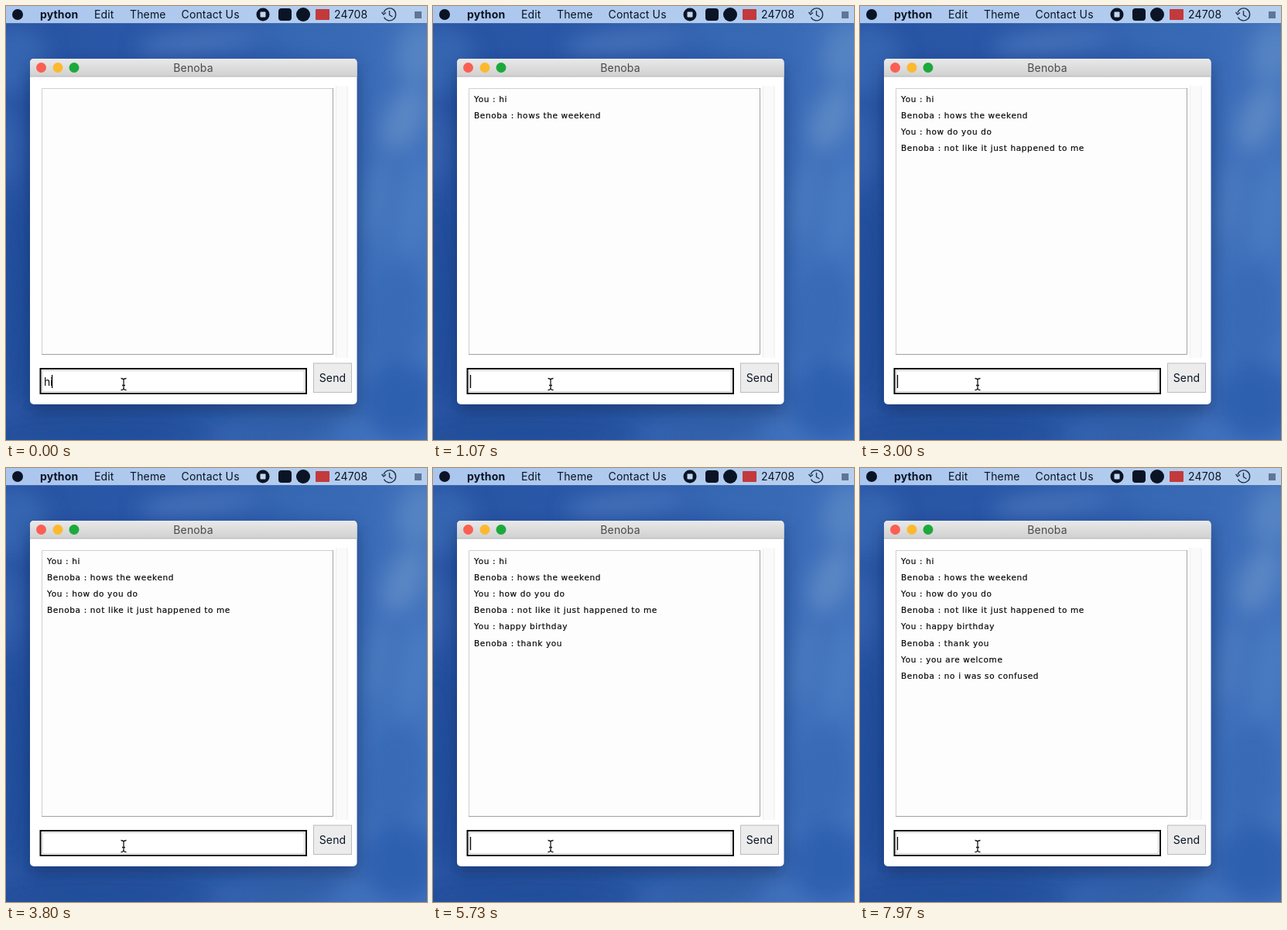
An HTML page that plays this animation: 544 by 560 pixels, repeating every 8000 ms.

```html
<!DOCTYPE html>
<html lang="en">
<head>
<meta charset="utf-8">
<title>Chat window</title>
<style>
html, body { margin: 0; width: 100%; height: 100%; overflow: hidden; background: #2a58a6; }
svg { display: block; width: 544px; height: 560px; }
text { white-space: pre; }
.ui { font: 14px Inter, "Open Sans", sans-serif; letter-spacing: .15px; fill: #0a1424; }
.entry { font: 14px Inter, "Open Sans", sans-serif; letter-spacing: -.3px; fill: #0a0a0a; }
.log { font: 10.5px "DejaVu Sans", sans-serif; letter-spacing: .64px; fill: #0a0a0a; stroke: #0a0a0a; stroke-width: .2px; }
</style>
</head>
<body>
<svg viewBox="0 0 544 560">
  <defs>
    <linearGradient id="sky" x2="1" y2=".15">
      <stop offset="0" stop-color="#2853a2"/>
      <stop offset=".5" stop-color="#2b5aaa"/>
      <stop offset="1" stop-color="#4273bd"/>
    </linearGradient>
    <linearGradient id="menu">
      <stop offset="0" stop-color="#abc6ee"/>
      <stop offset="1" stop-color="#b6cfee"/>
    </linearGradient>
    <linearGradient id="bar" x2="0" y2="1">
      <stop offset="0" stop-color="#e9e9e9"/>
      <stop offset="1" stop-color="#d0d0d0"/>
    </linearGradient>
    <filter id="soft" x="-60%" y="-60%" width="220%" height="220%"><feGaussianBlur stdDeviation="13"/></filter>
    <filter id="shade" x="-20%" y="-20%" width="140%" height="140%"><feGaussianBlur stdDeviation="11"/></filter>
  </defs>

  <rect width="544" height="560" fill="url(#sky)"/>
  <g id="clouds" filter="url(#soft)"></g>
  <rect x="30" y="78" width="424" height="446" rx="6" fill="#0c2452" opacity=".5" filter="url(#shade)"/>

  <rect width="544" height="22" fill="url(#menu)"/>
  <path d="M0 22.5H544" stroke="#4a70ac" opacity=".6"/>
  <circle cx="15" cy="11" r="7" fill="#0a1424"/>
  <g class="ui">
    <text x="44" y="16" font-weight="700">python</text>
    <text x="114" y="16">Edit</text>
    <text x="160" y="16">Theme</text>
    <text x="226.5" y="16">Contact Us</text>
    <text x="424" y="16">24708</text>
  </g>
  <circle cx="332" cy="11" r="8.5" fill="#0a1424"/>
  <rect x="328.5" y="7.5" width="7" height="7" rx="1" fill="#c2d6f0"/>
  <rect x="352" y="3" width="17" height="16" rx="4" fill="#0a1424"/>
  <circle cx="384" cy="11" r="9" fill="#0a1424"/>
  <rect x="400" y="4" width="18" height="14" rx="1" fill="#c23a3c"/>
  <g fill="none" stroke="#22344e" stroke-width="1.4">
    <path d="M488.5 14.5A8 8 0 1 0 488 8.5M485.5 8l2.4 3 3-2.5"/>
    <path d="M495.5 6v5.5l4 2.5"/>
  </g>
  <rect x="528" y="7" width="9" height="9" fill="#5f7698"/>

  <rect x="31" y="68" width="422.5" height="446" rx="5" fill="#fff"/>
  <path d="M31 91V73q0-5 5-5H448.5q5 0 5 5V91z" fill="url(#bar)"/>
  <path d="M31 91H453.5" stroke="#b4b4b4"/>
  <circle cx="45.5" cy="79.5" r="6.5" fill="#fa5f52"/>
  <circle cx="67" cy="79.5" r="6.5" fill="#fcb92e"/>
  <circle cx="88" cy="79.5" r="6.5" fill="#1ca93c"/>
  <text class="ui" x="242" y="85" text-anchor="middle" style="fill:#4a4a4a">Benoba</text>

  <rect x="46" y="106" width="376.5" height="344" fill="#fdfdfd"/>
  <path d="M46.5 450V106.5H422" fill="none" stroke="#cfcfcf"/>
  <path d="M46 449.5H422.5V106" fill="none" stroke="#a2a2a2"/>
  <rect x="426" y="103" width="15.5" height="351" fill="#fafafa"/>
  <path d="M426.5 103V454M441 103V454" stroke="#eee"/>
  <g id="log" class="log"></g>

  <rect x="44.5" y="468" width="343.5" height="32" fill="#fff" stroke="#080808" stroke-width="2"/>
  <rect x="47" y="470.5" width="338.5" height="27" fill="none" stroke="#cdcdcd"/>
  <text id="entry" class="entry" x="49" y="489.5"></text>
  <path id="caret" d="M0 476V493" stroke="#080808" stroke-width="1.3"/>
  <rect x="397.5" y="461" width="49" height="37.5" fill="#ececec" stroke="#bcbcbc"/>
  <text class="ui" x="422" y="484.5" text-anchor="middle">Send</text>

  <path d="M148.5 480.5q3.500 0 3.500 2.500v10q0 2.500-3.500 2.500M155.500 480.500q-3.500 0-3.500 2.500v10q0 2.500 3.500 2.500M150 489.500h4" fill="none" stroke="#1a1a1a" stroke-width="1.3"/>
</svg>
<script>
const LOOP = 8000, BOT = "Benoba";
// start and end of typing, and the moment of sending, in ms
const turns = [
  { say: "hi", from: -300, to: 0, sent: 600, reply: "hows the weekend" },
  { say: "how do you do", from: 1250, to: 2150, sent: 2950, reply: "not like it just happened to me" },
  { say: "happy birthday", from: 3980, to: 5200, sent: 5480, reply: "thank you" },
  { say: "you are welcome", from: 5750, to: 6900, sent: 7420, reply: "no i was so confused" }
];
// x, y, rx, ry, tilt, colour
const clouds = [
  [10, 70, 45, 45, 0, "#3565b0"], [5, 180, 25, 50, 0, "#315fab"],
  [5, 380, 30, 130, 0, "#244f9c"], [250, 46, 80, 16, -6, "#4470b8"],
  [400, 40, 70, 16, 8, "#386ab4"], [535, 60, 30, 40, 20, "#5583c2"],
  [515, 145, 24, 45, 25, "#5a86c4"], [480, 250, 16, 55, 10, "#4a79be"],
  [530, 260, 18, 60, 10, "#4a7bc2"], [500, 400, 40, 70, 8, "#376ab6"],
  [510, 510, 50, 50, 0, "#2f61b0"], [360, 550, 70, 18, -8, "#315fa8"],
  [120, 552, 150, 18, 0, "#244d98"]
];

const $ = id => document.getElementById(id);
const svgNode = (name, attrs, parent) => {
  const node = document.createElementNS("http://www.w3.org/2000/svg", name);
  for (const key in attrs) node.setAttribute(key, attrs[key]);
  return parent.appendChild(node);
};

for (const [cx, cy, rx, ry, tilt, fill] of clouds)
  svgNode("ellipse", { cx, cy, rx, ry, fill, transform: `rotate(${tilt} ${cx} ${cy})` }, $("clouds"));

const lines = [];
for (const turn of turns)
  for (const words of [`You : ${turn.say}`, `${BOT} : ${turn.reply}`]) {
    const node = svgNode("text", { x: 53, y: 124 + lines.length * 21.1 }, $("log"));
    node.textContent = words;
    lines.push({ node, sent: turn.sent });
  }

function typed({ say, from, to }, t) {
  const share = Math.min(1, Math.max(0, (t - from) / (to - from)));
  return Math.floor(share * say.length + 1e-6);
}

function draw(t) {
  const turn = turns.find(item => t < item.sent);
  const count = turn ? typed(turn, t) : 0;
  const words = turn ? turn.say.slice(0, count) : "";
  for (const { node, sent } of lines)
    node.setAttribute("visibility", t >= sent ? "visible" : "hidden");

  const entry = $("entry");
  entry.textContent = words;
  const width = words ? entry.getComputedTextLength() : 0;
  $("caret").setAttribute("transform", `translate(${48.5 + width})`);

  // the blink restarts with each key press
  let lastKey = 0;
  for (const item of turns) {
    if (t >= item.sent) lastKey = item.sent;
    else if (item === turn && count)
      lastKey = item.from + (item.to - item.from) * count / item.say.length;
  }
  $("caret").setAttribute("visibility", (t - lastKey) % 900 < 600 ? "visible" : "hidden");
}

const start = performance.now();
function tick() {
  draw((performance.now() - start) % LOOP);
  requestAnimationFrame(tick);
}
draw(0);
requestAnimationFrame(tick);
</script>
</body>
</html>
```
